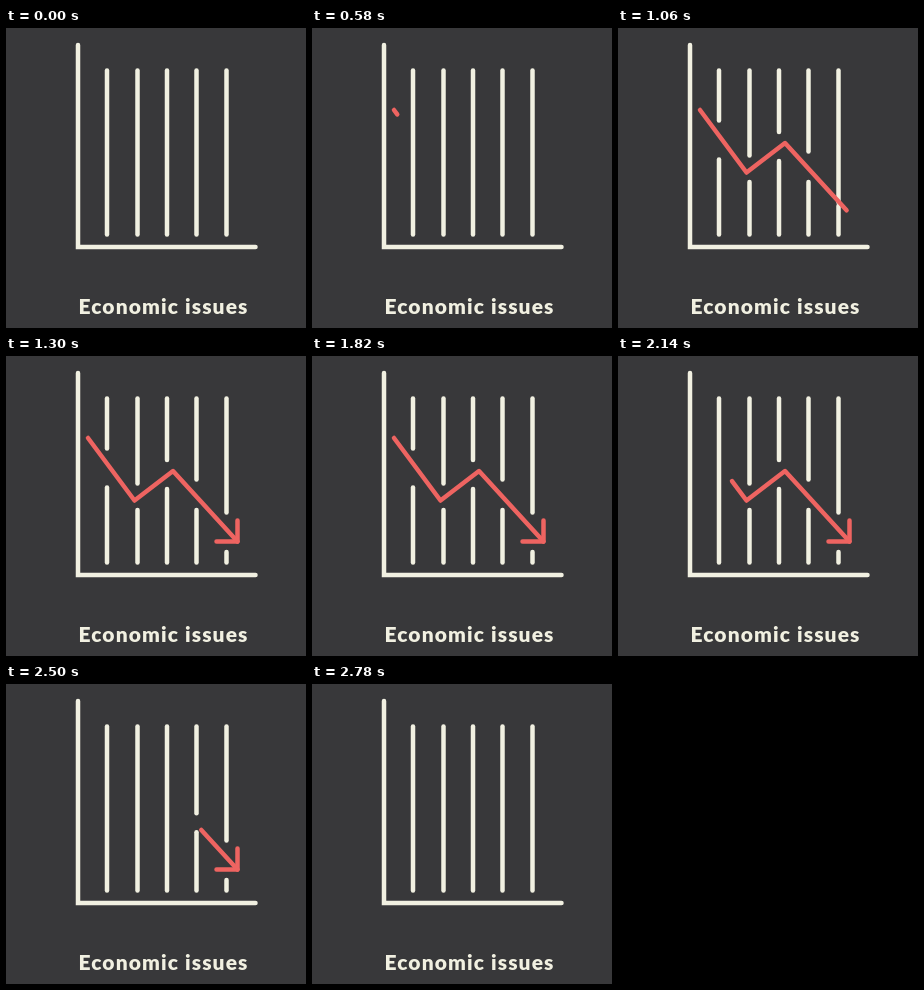
Animation of 300 by 300 pixels, one loop 3220 ms. Source, as an HTML page with a canvas:

```html
<!DOCTYPE html>
<html lang="en">
<head>
<meta charset="utf-8">
<title>Economic issues</title>
<style>
html, body { margin: 0; width: 100%; height: 100%; overflow: hidden; background: #38383a; }
canvas { display: block; width: 300px; height: 300px; }
</style>
</head>
<body>
<canvas id="stage" width="300" height="300"></canvas>
<script>
const ctx = document.getElementById('stage').getContext('2d');
const LOOP = 3220, STEP = 40, OFFSET = 20;
const BG = '#38383a', CREAM = '#f1f0e1', RED = '#ee6461';
const TOP = 42.5, BOTTOM = 206.5;

// x, then the cap centres on either side of the open gap
const bars = [
  [101, 92.5, 131.5],
  [131.5, 127.5, 154],
  [161, 104, 133],
  [190.5, 123.5, 154],
  [220.5, 156.5, 196]
];
const trend = [[82, 82], [128.5, 144.5], [167, 115], [231.5, 185.5]];
const corner = [231.5, 185.5], HEAD = 21;

const dist = (a, b) => Math.hypot(b[0] - a[0], b[1] - a[1]);
const total = trend.slice(1).reduce((sum, p, i) => sum + dist(trend[i], p), 0);
const clamp = v => Math.min(1, Math.max(0, v));
const span = (t, from, to) => clamp((t - from) / (to - from));
const smooth = u => u * u * (3 - 2 * u);
const mix = (a, b, u) => a + (b - a) * u;

function line(points, color) {
  ctx.strokeStyle = color;
  ctx.beginPath();
  points.forEach(p => ctx.lineTo(p[0], p[1]));
  ctx.stroke();
}

// Part of the trend line between two lengths
function trim(from, to) {
  const out = [];
  let start = 0;
  for (let i = 1; i < trend.length; i++) {
    const a = trend[i - 1], b = trend[i], len = dist(a, b);
    const lo = Math.max(from, start), hi = Math.min(to, start + len);
    if (lo <= hi) {
      for (const s of [lo, hi]) {
        const u = (s - start) / len;
        out.push([mix(a[0], b[0], u), mix(a[1], b[1], u)]);
      }
    }
    start += len;
  }
  return out;
}

// Gap opening by how far the line end lies past the bar
function opening(past) {
  const u = clamp((10 - past) / 19);
  return Math.sqrt(1 - u * u);
}

function drawBar([x, a, b], open) {
  if (open <= 0) return line([[x, TOP], [x, BOTTOM]], CREAM);
  const mid = (a + b) / 2;
  line([[x, TOP], [x, mix(mid, a, open)]], CREAM);
  line([[x, mix(mid, b, open)], [x, BOTTOM]], CREAM);
}

function draw(t) {
  const visible = t >= 500 && t < 2780;
  const drawn = smooth(Math.pow(span(t, 480, 1100), 1.3));
  const erased = smooth(span(t, 1820, 2820));
  const path = visible ? trim(erased * total, drawn * total) : [];
  const head = smooth(span(t, 1060, 1300)) * (1 - smooth(span(t, 2580, 2780)));
  const lastGap = smooth(span(t, 1020, 1240)) * (1 - smooth(span(t, 2600, 2780)));

  ctx.fillStyle = BG;
  ctx.fillRect(0, 0, 300, 300);
  ctx.lineWidth = 4.5;
  ctx.lineCap = 'round';
  ctx.lineJoin = 'miter';
  line([[72, 17], [72, 219], [249.5, 219]], CREAM);

  ctx.lineJoin = 'round';
  bars.forEach((bar, i) => {
    let open = 0;
    if (i === bars.length - 1) open = lastGap;
    else if (path.length) {
      const tail = path[0][0], tip = path[path.length - 1][0];
      open = Math.min(opening(tip - bar[0]), opening(bar[0] - tail));
    }
    drawBar(bar, open);
  });

  if (path.length) line(path, RED);
  if (visible && head > 0) {
    const [x, y] = corner, r = HEAD * head;
    line([[x, y - r], [x, y], [x - r, y]], RED);
  }

  ctx.fillStyle = CREAM;
  ctx.font = '900 21px Lato, "Open Sans", sans-serif';
  ctx.letterSpacing = '1.1px';
  ctx.textAlign = 'center';
  ctx.textBaseline = 'alphabetic';
  ctx.fillText('Economic issues', 157.5, 286);
}

const origin = performance.now();
function tick() {
  const t = (performance.now() - origin) % LOOP;
  draw(Math.floor((t - OFFSET) / STEP) * STEP + OFFSET);
  requestAnimationFrame(tick);
}
tick();
</script>
</body>
</html>
```
